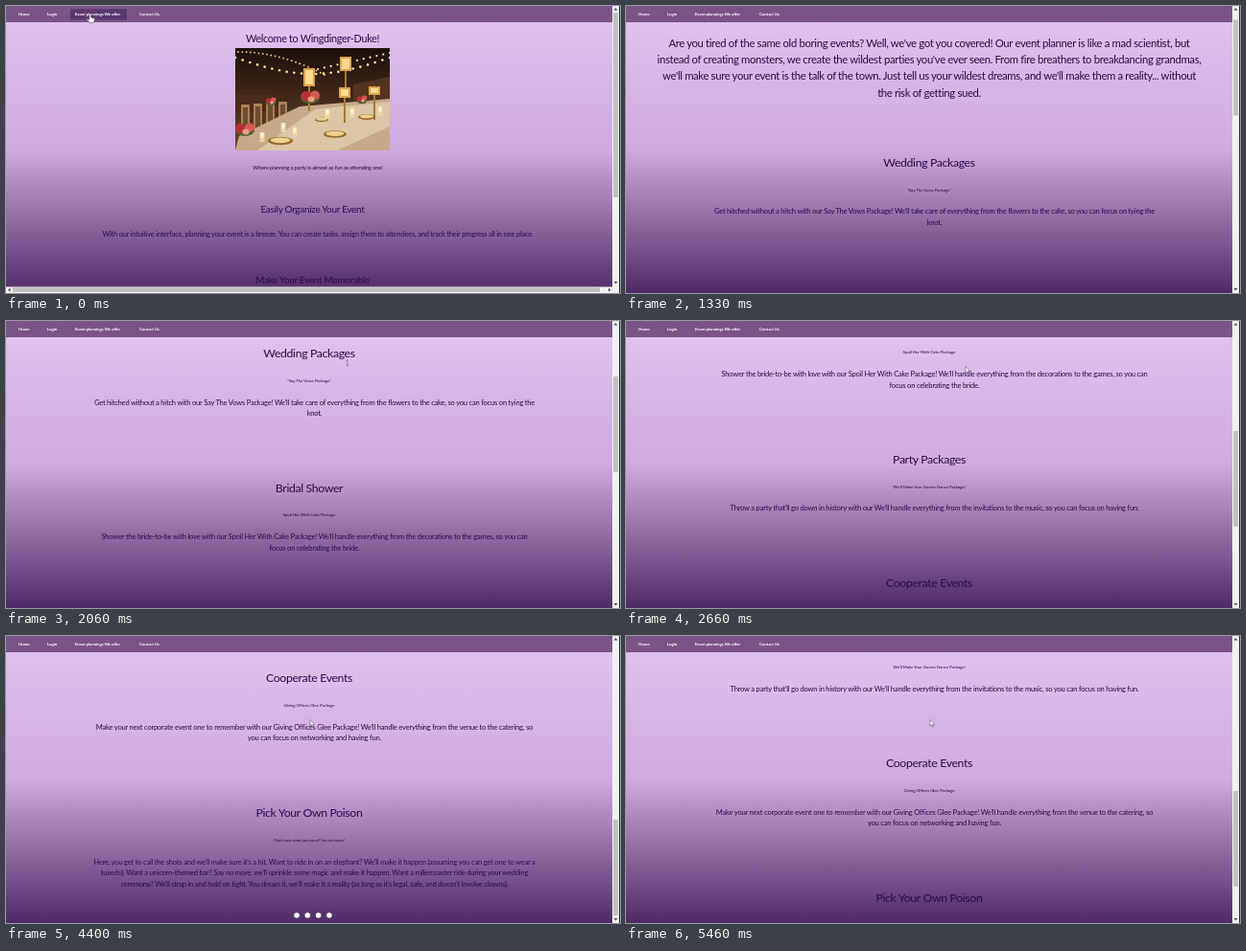
Write an HTML page that moves like this. It is 640 by 300 pixels and loops after 5.53 s.

```html
<!DOCTYPE html>
<html lang="en">
<head>
<meta charset="utf-8">
<title>Event planner tour</title>
<style>
html, body { margin: 0; width: 100%; height: 100%; overflow: hidden; background: #4f2b66; }
svg { display: block; width: 640px; height: 300px; }
text { font-family: Lato, "Open Sans", sans-serif; fill: #2b0d49; text-anchor: middle; letter-spacing: -.03em; }
.nav text { fill: #fff; font-weight: 700; font-size: 4.5px; text-anchor: start; }
</style>
</head>
<body>
<svg id="stage" viewBox="0 0 640 300">
  <defs>
    <linearGradient id="sky" x1="0" y1="0" x2="0" y2="1">
      <stop offset="0" stop-color="#e0c5ee"/>
      <stop offset=".5" stop-color="#cfa9e0"/>
      <stop offset="1" stop-color="#4f2b66"/>
    </linearGradient>
    <linearGradient id="dusk" x1="0" y1="0" x2="0" y2="1">
      <stop offset="0" stop-color="#1c110c"/>
      <stop offset=".45" stop-color="#3f2618"/>
      <stop offset="1" stop-color="#6b4a35"/>
    </linearGradient>
    <clipPath id="frame"><rect x="239" y="44" width="161" height="107"/></clipPath>
  </defs>
  <rect width="640" height="300" fill="url(#sky)"/>
  <g id="home"><g id="photo" clip-path="url(#frame)"></g></g>
  <g id="offer"></g>
  <g class="nav">
    <rect width="632" height="17" fill="#7b5487"/>
    <rect id="hover" x="67" y="3" width="59" height="11.5" fill="#593970"/>
    <text x="13" y="10.2">Home</text>
    <text x="43" y="10.2">Login</text>
    <text x="72" y="10.2">Event plannings We offer</text>
    <text x="139" y="10.2">Contact Us</text>
  </g>
  <g id="bars">
    <rect x="632" width="7" height="300" fill="#f1f1f1"/>
    <rect x="639" width="1" height="300" fill="#333"/>
    <path d="M633.5 4.5h4l-2-2.5z" fill="#505050"/>
    <path id="down" d="M633.5 295h4l-2 2.5z" fill="#505050"/>
    <rect id="thumb" x="633" y="7" width="5" fill="#c1c1c1"/>
    <g id="hbar">
      <rect y="293.5" width="639" height="6.5" fill="#f1f1f1"/>
      <rect x="7" y="294.3" width="612" height="4.7" fill="#c1c1c1"/>
      <path d="M4.5 294.7v4l-2.5-2zM628 294.7v4l2.5-2z" fill="#505050"/>
    </g>
  </g>
  <circle id="ring" r="6" fill="none" stroke-width="1"/>
  <g id="pointer">
    <path id="hand" d="M-1.2 -3.6q.9-1.2 1.8 0v2.6l3 .7q.8.3.7 1.3l-.6 3.4h-4.6l-2.5-3.4q.2-1 1.2-.5l1 .9z" fill="#fff" stroke="#4b3a55" stroke-width=".55"/>
    <path id="beam" d="M-1 -2.8h2M0 -2.8v5.6M-1 2.8h2" fill="none" stroke="#6e587c" stroke-width=".6"/>
    <path id="arrow" d="M-1 -3.5v6.6l1.5-1.3 1 2.3 1-.5-1-2.2h2z" fill="#fff" stroke="#4b3a55" stroke-width=".5"/>
  </g>
</svg>
<script>
const LOOP = 5530, SWITCH = 265, NS = "http://www.w3.org/2000/svg";
const $ = id => document.getElementById(id);

function add(parent, tag, attrs) {
  const el = document.createElementNS(NS, tag);
  for (const k in attrs) el.setAttribute(k, attrs[k]);
  return parent.appendChild(el);
}

// Places lines by the middle of their capitals.
function write(parent, x, y, size, step, ...lines) {
  lines.forEach((line, i) => {
    add(parent, "text", { x, y: y + i * step + size * .35, "font-size": size }).textContent = line;
  });
}

const home = $("home"), offer = $("offer");
write(home, 319.5, 34, 10.9, 0, "Welcome to Wingdinger-Duke!");
write(home, 325, 168.5, 5.8, 0, "Where planning a party is almost as fun as attending one!");
write(home, 319.5, 212, 10, 0, "Easily Organize Your Event");
write(home, 325, 238, 7.5, 0, "With our intuitive interface, planning your event is a breeze. You can create tasks, assign them to attendees, and track their progress all in one place.");
write(home, 319.5, 286, 10, 0, "Make Your Event Memorable");

write(offer, 316, 61, 11.3, 17.3,
  "Are you tired of the same old boring events? Well, we've got you covered! Our event planner is like a mad scientist, but",
  "instead of creating monsters, we create the wildest parties you've ever seen. From fire breathers to breakdancing grandmas,",
  "we'll make sure your event is the talk of the town. Just tell us your wildest dreams, and we'll make them a reality... without",
  "the risk of getting sued.");

function section(y, title, sub, ...lines) {
  write(offer, 316, y, 12.3, 0, title);
  write(offer, 316, y + 28.5, 4.6, 0, sub);
  write(offer, 321.5, y + 51, 7.6, 11.6, ...lines);
}
section(186, "Wedding Packages", "\"Say The Vows Package\"",
  "Get hitched without a hitch with our Say The Vows Package! We'll take care of everything from the flowers to the cake, so you can focus on tying the",
  "knot.");
section(326.5, "Bridal Shower", "Spoil Her With Cake Package",
  "Shower the bride-to-be with love with our Spoil Her With Cake Package! We'll handle everything from the decorations to the games, so you can",
  "focus on celebrating the bride.");
section(467, "Party Packages", "We'll Make Your Guests Dance Package!",
  "Throw a party that'll go down in history with our We'll handle everything from the invitations to the music, so you can focus on having fun.");
section(596, "Cooperate Events", "Giving Offices Glee Package",
  "Make your next corporate event one to remember with our Giving Offices Glee Package! We'll handle everything from the venue to the catering, so",
  "you can focus on networking and having fun.");
section(737, "Pick Your Own Poison", "Don't see what you need? Let us know!",
  "Here, you get to call the shots and we'll make sure it's a hit. Want to ride in on an elephant? We'll make it happen (assuming you can get one to wear a",
  "tuxedo). Want a unicorn-themed bar? Say no more, we'll sprinkle some magic and make it happen. Want a rollercoaster ride during your wedding",
  "ceremony? We'll strap in and hold on tight. You dream it, we'll make it a reality (as long as it's legal, safe, and doesn't involve clowns).");
for (let i = 0; i < 4; i++) add(offer, "circle", { cx: 303 + i * 11.3, cy: 844, r: 2.8, fill: "#fff" });

function paintPhoto() {
  const p = $("photo");
  const dot = (cx, cy, rx, ry, fill) => add(p, "ellipse", { cx, cy, rx, ry, fill });
  const box = (x, y, width, height, fill) => add(p, "rect", { x, y, width, height, fill });
  const shape = (d, fill) => add(p, "path", { d, fill });
  box(239, 44, 161, 107, "url(#dusk)");
  box(239, 93, 40, 18, "#4a2b1c");
  shape("M362 82L400 74V112L362 105z", "#54331f");
  // Strings of bulbs
  for (let i = 0; i < 22; i++) {
    const u = i / 21;
    dot(239 + 161 * u, 54 + 17 * Math.sin(Math.PI * u), 1.3, 1.3, "#ffe9a6");
    dot(242 + 90 * u, 48 + 24 * u * u, .9, .9, "#ffd27a");
    if (i < 12) dot(325 + 75 * i / 11, 66 - 17 * i / 11, 1.1, 1.1, "#fff0c0");
  }
  // Chairs
  for (let i = 0; i < 4; i++) {
    box(245 + i * 13, 103 - i, 9, 29, "#a98052");
    box(247 + i * 13, 106 - i, 5, 23, "#6f4b30");
  }
  shape("M243 136L306 105L400 97V151H239z", "#c5a98a");
  shape("M262 151L322 108L400 100V126L345 151z", "#dcc6a7");
  // Lanterns
  for (const [x, y, h] of [[316, 65, 19], [354, 53, 15], [353, 85, 11], [384, 84, 9]]) {
    box(x - 1, y + h, 2, 26, "#a77835");
    box(x - 6, y, 12, h, "#dba24f");
    box(x - 4, y + 2, 8, h - 4, "#ffdc92");
  }
  // Flowers
  for (const [x, y] of [[317, 94], [249, 128], [371, 97], [276, 99]]) {
    const r = x < 320 && x !== 276 ? 5 : 2.7;
    dot(x, y + 2, r * 2, r * 1.2, "#53602f");
    dot(x - r * .9, y, r, r, "#b92f35");
    dot(x + r, y - 1, r, r * .9, "#d9574f");
    dot(x + 1, y + r * .7, r * .7, r * .6, "#eaa08a");
  }
  // Plates and candles
  for (const [x, y, r] of [[286, 141, 13], [343, 134, 12], [376, 116, 9], [329, 119, 7]]) {
    dot(x, y, r, r * .32, "#9a682d");
    dot(x, y - .7, r * .8, r * .22, "#efd18f");
  }
  for (const [x, y] of [[289, 122], [301, 127], [335, 108], [267, 132], [361, 107], [390, 105]]) {
    box(x - 2.5, y, 5, 10, "#ecd4a6");
    dot(x, y + 3, 1.8, 3, "#fff3c4");
  }
}
paintPhoto();

// Each key: time, then values; linear between keys.
function track(keys, t) {
  const i = keys.findIndex(k => k[0] > t);
  if (i < 0) return keys[keys.length - 1].slice(1);
  if (i === 0) return keys[0].slice(1);
  const a = keys[i - 1], b = keys[i], u = (t - a[0]) / (b[0] - a[0]);
  return a.slice(1).map((v, n) => v + (b[n + 1] - v) * u);
}

const scrollKeys = [
  [1150, 0], [1250, 6], [1330, 21.7], [1450, 83], [1600, 148], [1660, 152],
  [2060, 152], [2180, 170], [2600, 308], [2660, 322], [2900, 372], [3060, 386],
  [3200, 386], [3330, 408], [3750, 526], [3950, 552],
  [4800, 552], [4950, 540], [5330, 470], [5460, 463]
];
const pointerKeys = [
  [130, 88, 13], [260, 115, 33], [350, 161, 50], [500, 354, 42], [1130, 354, 42],
  [1330, 357, 41], [1860, 356, 41], [2600, 355, 51], [3800, 355, 51], [4300, 318, 91]
];

const show = (id, on) => $(id).setAttribute("display", on ? "inline" : "none");

function draw(t) {
  const first = t < SWITCH;
  const [y] = track(scrollKeys, t);
  const [px, py] = track(pointerKeys, t);
  show("home", first);
  show("hbar", first);
  show("offer", !first);
  offer.setAttribute("transform", `translate(0 ${-y})`);
  $("thumb").setAttribute("y", 7 + y * .335);
  $("thumb").setAttribute("height", first ? 193 : 100);
  $("down").setAttribute("transform", `translate(0 ${first ? -7 : 0})`);
  show("hover", t < 190);

  const ring = $("ring"), clicked = t < 190;
  show("ring", clicked || (t >= 350 && t < 900));
  ring.setAttribute("cx", clicked ? 88 : 161);
  ring.setAttribute("cy", clicked ? 10 : 50);
  ring.setAttribute("stroke", clicked ? "#c0434f" : "#b366a8");
  ring.setAttribute("stroke-dasharray", clicked ? "none" : "3 1");
  ring.setAttribute("opacity", clicked ? .55 : track([[600, .8], [900, 0]], t)[0]);

  $("pointer").setAttribute("transform", `translate(${px} ${py})`);
  show("hand", t < 1200);
  show("beam", t >= 1200 && t < 2400);
  show("arrow", t >= 2400);
}

function tick() {
  draw(performance.now() % LOOP);
  requestAnimationFrame(tick);
}
tick();
</script>
</body>
</html>
```
